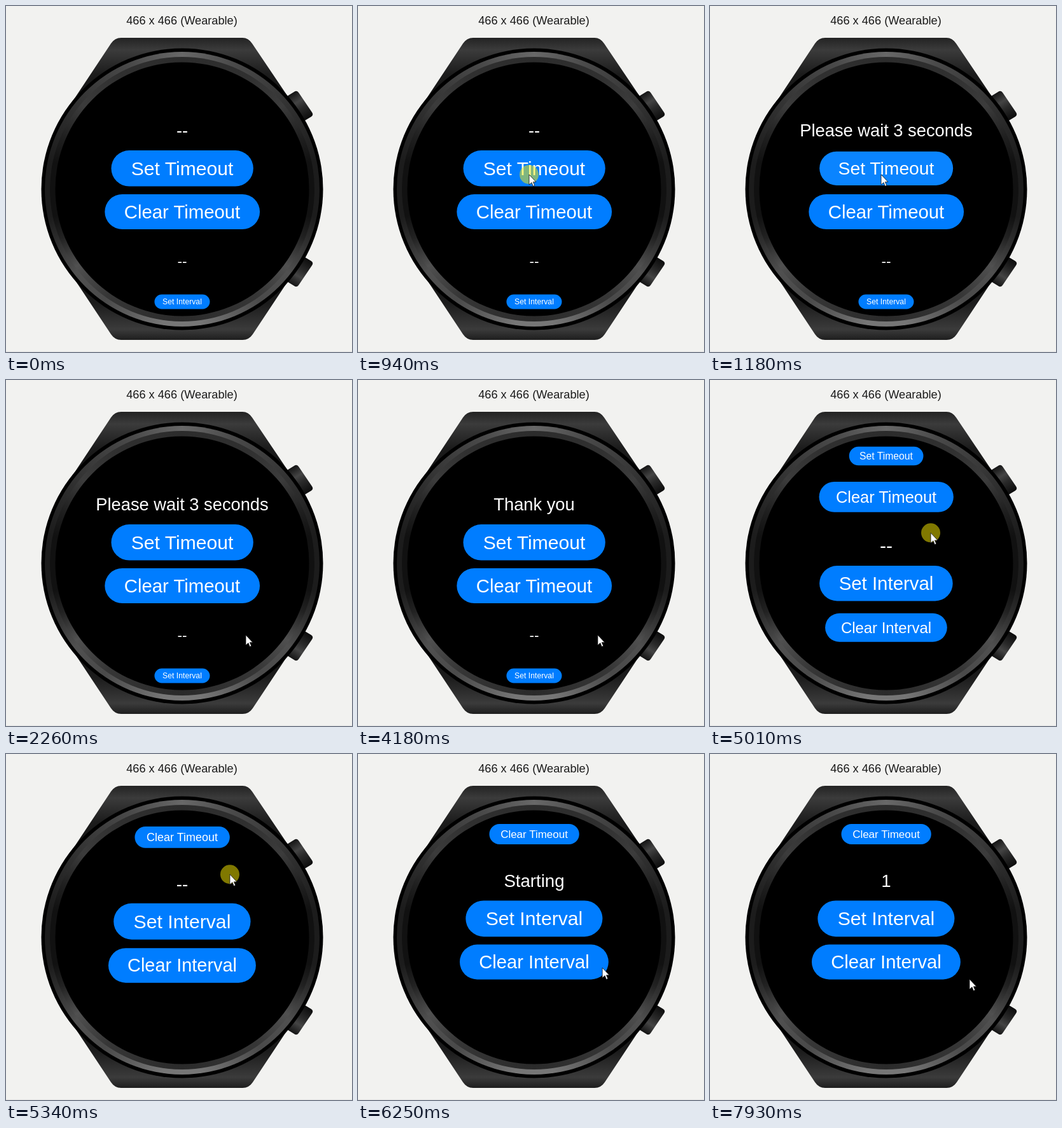
An HTML page for the animation above (8 s loop, 544x544 px).

```html
<!DOCTYPE html>
<html lang="en">
<head>
<meta charset="utf-8">
<title>Wearable timers</title>
<style>
html, body { margin: 0; width: 100%; height: 100%; overflow: hidden; background: #f2f2f0; }
body, #stage { font-family: "Liberation Sans", Arial, sans-serif; }
#stage { position: absolute; left: 0; top: 0; width: 544px; height: 544px; overflow: hidden; }
#stage > * { position: absolute; left: 0; top: 0; }
#title { width: 553px; top: 13px; text-align: center; font-size: 18.2px; line-height: 21px; color: #1b1b1b; }
#floor { top: 543px; width: 544px; height: 1px; background: #e6e6e5; }
#stage > .ring { left: 276.5px; top: 287.5px; border-radius: 50%; transform: translate(-50%, -50%); }
#case { width: 443px; height: 443px; background: #000; }
#bezel {
  width: 432px; height: 432px;
  background: conic-gradient(#686868, #4a4a4a 22deg, #383838 45deg, #262626 65deg, #1c1c1c 78deg 102deg,
    #303030 114deg, #505050 128deg, #4a4a4a 145deg, #767676 172deg 188deg, #4a4a4a 215deg, #505050 232deg,
    #303030 246deg, #1c1c1c 258deg 282deg, #262626 295deg, #383838 315deg, #4a4a4a 338deg, #686868);
}
#lip {
  width: 416px; height: 416px;
  background: conic-gradient(#2c2c2c, #303030 30deg, #3c3c3c 50deg, #202020 66deg, #111 78deg 102deg,
    #222 112deg, #505050 126deg, #363636 145deg, #2a2a2a 180deg, #363636 215deg, #505050 234deg,
    #222 248deg, #111 258deg 282deg, #202020 294deg, #3c3c3c 310deg, #303030 330deg, #2c2c2c);
}
#glass { width: 399px; height: 399px; background: #000; }
#list { width: 544px; height: 544px; clip-path: circle(199.5px at 276.5px 287.5px); }
.item {
  position: absolute; left: 276.5px; top: 0; height: 57px; padding: 0 31.5px; border-radius: 29px;
  font-size: 30.3px; line-height: 57px; white-space: nowrap; color: #fff;
}
</style>
</head>
<body>
<div id="stage">
  <svg width="544" height="544">
    <defs>
      <linearGradient id="strap" gradientUnits="userSpaceOnUse" x1="0" y1="50" x2="0" y2="525">
        <stop offset="0" stop-color="#232323"/><stop offset=".04" stop-color="#3b3b3b"/>
        <stop offset=".12" stop-color="#1c1c1c"/><stop offset=".2" stop-color="#141414"/>
        <stop offset=".8" stop-color="#141414"/><stop offset=".88" stop-color="#1c1c1c"/>
        <stop offset=".965" stop-color="#3b3b3b"/><stop offset="1" stop-color="#1e1e1e"/>
      </linearGradient>
      <linearGradient id="knob" gradientUnits="userSpaceOnUse" x1="450" y1="137" x2="475" y2="176">
        <stop offset="0" stop-color="#151515"/><stop offset=".35" stop-color="#444"/>
        <stop offset=".6" stop-color="#2a2a2a"/><stop offset="1" stop-color="#0e0e0e"/>
      </linearGradient>
      <path id="crown" d="M440 143L453 135Q457 132 460 136L481 167Q484 171 480 174L470 180Z" fill="url(#knob)"/>
    </defs>
    <path d="M104 151L165 59Q171 50 181 50H372Q381 50 387 59L449 151V424L388 516Q382 525 372 525H181Q171 525 165 516L104 424Z" fill="url(#strap)"/>
    <use href="#crown"/>
    <use href="#crown" transform="matrix(1 0 0 -1 0 575)"/>
  </svg>
  <div id="title">466 x 466 (Wearable)</div>
  <div id="floor"></div>
  <div id="case" class="ring"></div>
  <div id="bezel" class="ring"></div>
  <div id="lip" class="ring"></div>
  <div id="glass" class="ring"></div>
  <div id="list"></div>
  <svg id="pointer" width="1" height="1" overflow="visible">
    <circle id="touch" r="15" fill="#fff000" fill-opacity=".5"/>
    <path d="M0 0V16L4 12.5 6.3 18.3 8.8 17.2 6.4 11.7H11Z" fill="#fff" stroke="#111" stroke-width=".8"/>
  </svg>
</div>
<script>
const LOOP = 8000;
const $ = id => document.getElementById(id);

// Piecewise linear lookup in rows of [key, value, value, ...]
function lookup(rows, key, col = 1) {
  if (key <= rows[0][0]) return rows[0][col];
  const i = rows.findIndex(row => row[0] > key);
  if (i < 0) return rows[rows.length - 1][col];
  const a = rows[i - 1], b = rows[i];
  return a[col] + (b[col] - a[col]) * (key - a[0]) / (b[0] - a[0]);
}

// Item size by height on the round screen
const SIZE = [
  [60, .2], [90, .36], [120, .522], [131, .593], [184.5, .842], [198, .91], [230, .97],
  [260, .997], [288, .995], [324, .967], [352, .925], [390, .786], [404, .74], [440, .57], [465, .403], [505, .2]
];

// Scroll offset, then the centre of each item
const LAYOUT = [
  [0, 196, 255.3, 323.5, 401, 465, 505],
  [140, 70, 120, 184.5, 261, 320.5, 390],
  [192, 40, 75, 131, 204, 263.3, 332.5],
  [198, 36, 70, 126, 199, 258.8, 327],
  [240, 0, 30, 92, 155, 218, 287]
];

const SCROLL = [
  [4650, 0], [4800, 27], [4940, 88], [5010, 140], [5080, 187], [5150, 226],
  [5220, 238], [5280, 220], [5340, 192], [5440, 198]
];

const POINTER = [
  [110, 408, 501], [300, 385, 450], [500, 335, 360], [700, 285, 285], [870, 269, 265],
  [1240, 269, 265], [1450, 305, 310], [1700, 358, 373], [1890, 371, 402], [2190, 371, 402], [2260, 377, 401],
  [4180, 377, 401], [4400, 366, 386], [4650, 352, 382], [4800, 350, 355], [4940, 347, 294], [5010, 347, 241],
  [5080, 348, 194], [5150, 349, 155], [5220, 350, 143], [5280, 351, 161], [5340, 352, 189],
  [5560, 345, 245], [5790, 335, 268], [6060, 335, 268], [6250, 384, 336], [6490, 412, 358],
  [7929, 412, 358], [7930, 408, 354]
];

const HOLDS = [[940, 1180], [4650, 5360], [5850, 6050]];

// How far a button is pressed in: 0 to 1
const press = (down, up) => [[down, 0], [down + 120, 1], [up, 1], [up + 170, 0]];

const ITEMS = [
  { text: t => t < 1180 ? "--" : t < 4180 ? "Please wait 3 seconds" : "Thank you" },
  { label: "Set Timeout", press: press(940, 1190) },
  { label: "Clear Timeout" },
  { text: t => t < 6050 ? "--" : t < 7050 ? "Starting" : "1" },
  { label: "Set Interval", press: press(5850, 6050) },
  { label: "Clear Interval" }
];

for (const item of ITEMS) {
  item.el = document.createElement("div");
  item.el.className = "item";
  if (item.label) {
    item.el.textContent = item.label;
    item.el.style.background = "#007dff";
  }
  $("list").append(item.el);
}

function draw(t) {
  const scroll = lookup(SCROLL, t);
  ITEMS.forEach((item, i) => {
    const y = lookup(LAYOUT, scroll, i + 1);
    const depth = item.press ? lookup(item.press, t) : 0;
    const scale = lookup(SIZE, y) * (1 - .06 * depth);
    item.el.style.transform = `translate(-50%, ${y - 28.5}px) scale(${scale})`;
    if (item.press) item.el.style.background = `rgb(${10 * depth}, ${125 + 7 * depth}, 255)`;
    if (item.text && item.el.textContent !== item.text(t)) item.el.textContent = item.text(t);
  });
  const x = lookup(POINTER, t), y = lookup(POINTER, t, 2);
  $("pointer").style.transform = `translate(${x}px, ${y}px)`;
  $("pointer").style.visibility = t < 110 ? "hidden" : "visible";
  $("touch").style.display = HOLDS.some(([from, to]) => t >= from && t < to) ? "" : "none";
}

const start = performance.now();
function tick() {
  draw((performance.now() - start) % LOOP);
  requestAnimationFrame(tick);
}
tick();
</script>
</body>
</html>
```
